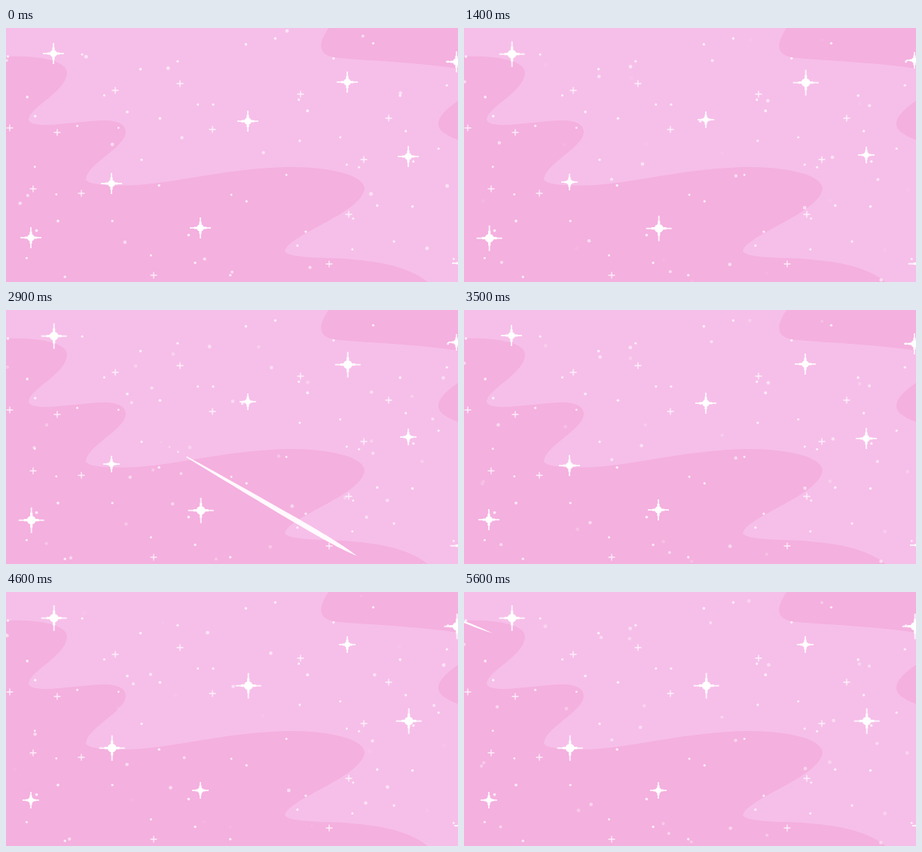
An HTML page that plays this animation: 600x338 px, repeating every 5700 ms.

```html
<!DOCTYPE html>
<html lang="en">
<head>
<meta charset="utf-8">
<title>Pink sky</title>
<style>
  html, body { margin: 0; width: 100%; height: 100%; overflow: hidden; background: #f6bfe9; }
  svg { display: block; width: 100vw; height: 100vh; }
  .cloud { fill: #f4b0df; }
  .sky { fill: #fff; filter: blur(.65px); }
</style>
</head>
<body>
<svg viewBox="0 0 600 338" preserveAspectRatio="none">
  <rect width="600" height="338" fill="#f6bfe9"/>
  <g class="cloud">
    <path d="M0 38C38 36 82 42 81 60C79 86 31 105 30 122C34 137 96 123 130 123C150 123 159 129 159 139C157 160 107 181 106 202C112 211 160 211 195 207C250 200 310 186 375 185C440 185 476 198 476 214C471 247 376 274 370 297C378 308 425 304 460 308C510 312 540 322 560 338H0Z"/>
    <path d="M428 0C412 24 415 38 442 40C490 44 550 46 600 54V0Z"/>
    <path d="M600 97C572 116 570 128 578 137Q586 144 600 149Z"/>
  </g>
  <g class="sky">
    <g id="dots" opacity=".75"></g>
    <g id="drift"></g>
    <g id="meteors"></g>
    <g id="stars"></g>
  </g>
</svg>
<script>
const WIDTH = 600, HEIGHT = 338;
const LOOP = 5700, STEP = 100, CYCLE = 2000;

// +1 brightens the first group of stars, -1 the second; steady stars grow on both.
const TWINKLE = [0, -1, 0, 1, 1];
const groups = {
  first: swing => swing,
  second: swing => -swing,
  steady: Math.abs
};
const stars = [
  [63, 34, "steady"], [453, 72, "first"], [258, 266, "first"], [33, 279, "first"], [606, 313, "first"],
  [321, 124, "second"], [534, 171, "second"], [140, 207, "second"], [598, 45, "second"]
];
const crosses = [
  [145, 83], [231, 74], [391, 88], [274, 135], [508, 120], [475, 175], [5, 133],
  [68, 139], [36, 214], [100, 220], [196, 329], [429, 314], [455, 248]
];
const meteors = [
  { start: 600, x: 4, y: 58, slope: .583, speed: 154, length: 262, width: 8.5, life: 600 },
  { start: 1600, x: 38, y: 55, slope: .4, speed: 170, length: 150, width: 3, life: 300 }
];

const layer = id => document.getElementById(id);
const circle = (x, y, r, opacity = 1) => `<circle cx="${x}" cy="${y}" r="${r}" opacity="${opacity}"/>`;
const cross = (x, y, arm, width, opacity = 1) =>
  `<path d="M${x - arm} ${y}h${2 * arm}M${x} ${y - arm}v${2 * arm}" stroke="#fff" stroke-width="${width}" opacity="${opacity}"/>`;

function seededRandom(seed) {
  return () => {
    seed = seed * 16807 % 2147483647;
    return seed / 2147483647;
  };
}

// One point somewhere in each cell of a grid, so that the spread stays even.
function scatter(columns, rows, seed) {
  const random = seededRandom(seed);
  return Array.from({ length: columns * rows }, (_, i) => ({
    x: (i % columns + random()) * WIDTH / columns,
    y: (Math.floor(i / columns) + random()) * HEIGHT / rows,
    size: random(),
    vx: 3 * random() - 1.5,
    vy: 3 * random() - 2.5
  }));
}

const dots = scatter(9, 6, 4711);
const driftSets = [0, 1, 2].map(i => ({
  peak: i * CYCLE / 3,
  points: scatter(6, 3, 900 + 77 * i)
}));

function drawStar([x, y, group], swing) {
  const size = groups[group](swing);
  const arm = 14 + 3 * size;
  const cx = x + .7 * Math.max(0, size);
  const cy = y + (size < 0 ? -2 : .7 * size);
  return cross(cx, cy, arm, 2, .8) + cross(cx, cy, arm * .58, 3.2, .9) + circle(cx, cy, arm * .34);
}

function drawDrift({ peak, points }, phase) {
  const raw = phase - peak;
  const offset = raw - CYCLE * Math.round(raw / CYCLE);
  const alpha = .55 * Math.max(0, Math.cos(offset / CYCLE * 3 * Math.PI / 2));
  if (Math.abs(offset) > CYCLE / 3) return "";
  const steps = offset / STEP;
  return `<g opacity="${alpha}">` + points.map(p =>
    circle(p.x + p.vx * steps, p.y + p.vy * steps, 2 + .5 * p.size)).join("") + "</g>";
}

function drawMeteor({ start, x, y, slope, speed, length, width, life }, phase) {
  const age = phase - start;
  if (age < 0 || age >= life) return "";
  const travel = age / STEP * speed;
  const angle = Math.atan(slope) * 180 / Math.PI;
  const half = width / 2;
  const side = sign => `${-length * .14} ${sign * half * 1.1} ${-length * .3} ${sign * half}`;
  const body = `M0 0C${side(-1)} ${-length} -.8V.8C${-length * .3} ${half} ${-length * .14} ${half * 1.1} 0 0Z`;
  const tail = [1, 2, 3].map(i => circle(-length * (1 + .05 * i), 0, 1.4, .8 - .2 * i)).join("");
  return `<g opacity=".92" transform="translate(${x + travel} ${y + travel * slope}) rotate(${angle})">` +
    `<path d="${body}"/>${tail}</g>`;
}

function render(time) {
  const step = Math.floor(time % LOOP / STEP);
  const phase = step * STEP % CYCLE;
  const swing = TWINKLE[step % TWINKLE.length];
  layer("stars").innerHTML = stars.map(star => drawStar(star, swing)).join("");
  layer("drift").innerHTML = driftSets.map(set => drawDrift(set, phase)).join("");
  layer("meteors").innerHTML = meteors.map(m => drawMeteor(m, phase)).join("");
}

layer("dots").innerHTML =
  dots.map(p => circle(p.x, p.y, 1.4 + .5 * p.size)).join("") +
  crosses.map(([x, y]) => cross(x, y, 4.5, 1.8, .75) + circle(x, y, 1.6, .75)).join("");

const startTime = performance.now();
function tick() {
  render(performance.now() - startTime);
  requestAnimationFrame(tick);
}
tick();
</script>
</body>
</html>
```
